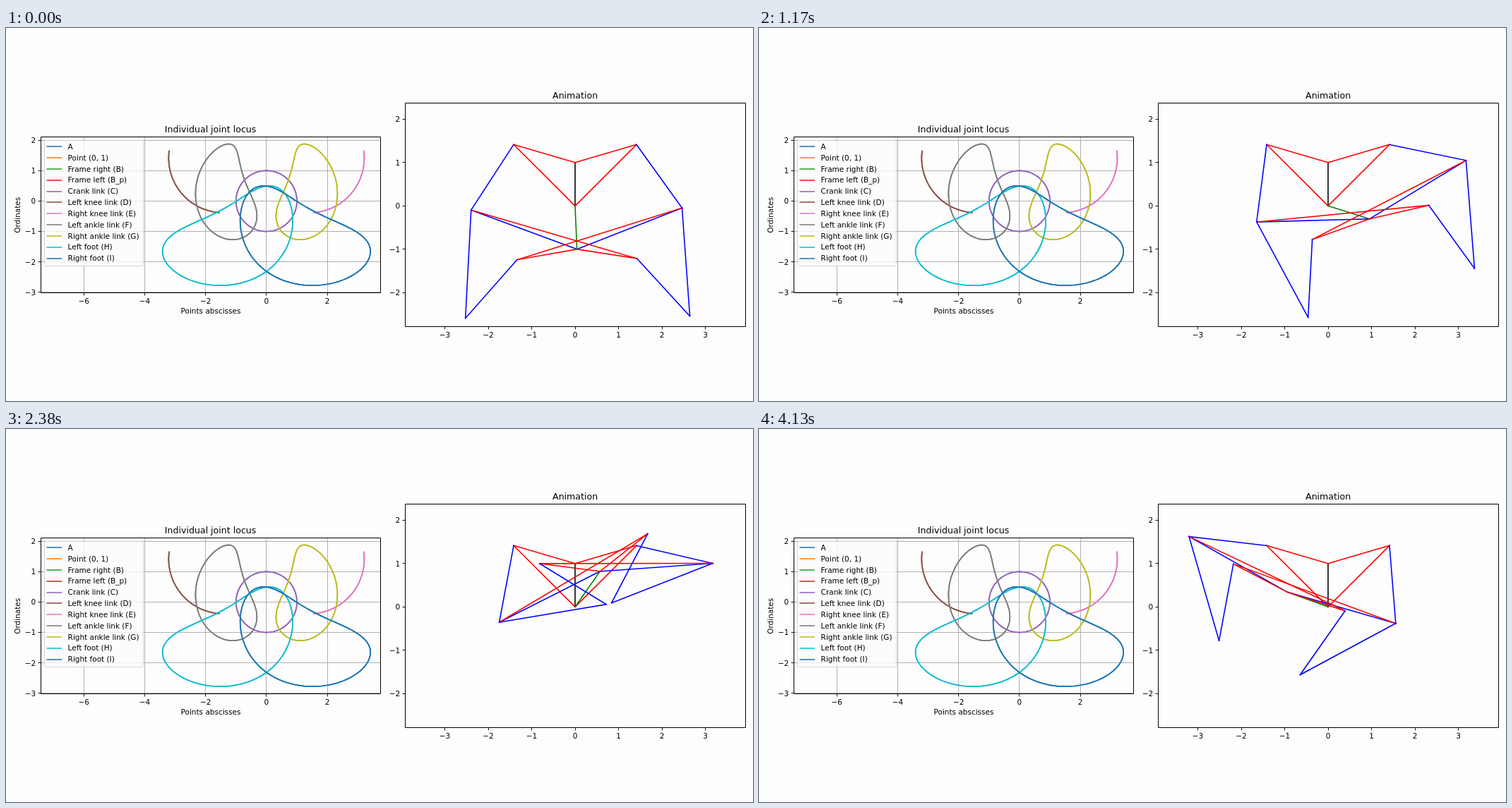
An HTML page with a canvas for the animation above (4180 ms loop, 1058 by 529 pixels).

```html
<!DOCTYPE html>
<html lang="en">
<head>
<meta charset="utf-8">
<title>Walking linkage</title>
<style>
html, body { margin: 0; width: 100%; height: 100%; overflow: hidden; background: #fdfdfd; }
canvas { display: block; }
</style>
</head>
<body>
<canvas id="stage" width="1058" height="529"></canvas>
<script>
const ctx = document.getElementById('stage').getContext('2d');
const PAPER = '#fdfdfd';
const PT = 1058 / 14 / 72;
const LOOP = 4180, FRAMES = 100;
const STEP = Math.PI / 72;

const locusPlot = {
  left: 49.5, right: 530.5, top: 154.5, bottom: 375.5,
  x0: 368.9, y0: 245.4, scale: 43.1,
  xTicks: [-6, -4, -2, 0, 2], yTicks: [2, 1, 0, -1, -2, -3],
  title: 'Individual joint locus', grid: true
};
const linkPlot = {
  left: 565.5, right: 1047.5, top: 106.5, bottom: 423.5,
  x0: 806, y0: 252.3, scale: 61.5,
  xTicks: [-3, -2, -1, 0, 1, 2, 3], yTicks: [2, 1, 0, -1, -2],
  title: 'Animation', grid: false
};

const legend = [
  ['A', '#1f77b4'], ['Point (0, 1)', '#ff7f0e'], ['Frame right (B)', '#2ca02c'],
  ['Frame left (B_p)', '#d62728'], ['Crank link (C)', '#9467bd'],
  ['Left knee link (D)', '#8c564b'], ['Right knee link (E)', '#e377c2'],
  ['Left ankle link (F)', '#7f7f7f'], ['Right ankle link (G)', '#bcbd22'],
  ['Left foot (H)', '#17becf'], ['Right foot (I)', '#1f77b4']
];
const jointNames = 'AYBPCDEFGHI';

// Bars in drawing order: colour, then pairs of joints
const bars = [
  ['#000', 'AY'], ['#f00', 'BA BY PA PY'], ['#008000', 'CA'],
  ['#00f', 'DP DC EB EC'], ['#f00', 'FC FE GC GD'], ['#00f', 'HD HF IE IG']
];

const polar = (p, r, a) => [p[0] + r * Math.cos(a), p[1] + r * Math.sin(a)];
const heading = (p, q) => Math.atan2(q[1] - p[1], q[0] - p[0]);

// Intersection of two circles, on the chosen side of the line p to q
function meet(p, rp, q, rq, side) {
  const d = Math.hypot(q[0] - p[0], q[1] - p[1]);
  const bend = Math.acos((rp * rp - rq * rq + d * d) / (2 * d * rp));
  return polar(p, rp, heading(p, q) + side * bend);
}

function pose(angle) {
  const A = [0, 0], Y = [0, 1];
  const B = polar(A, 2, Math.PI / 4), P = polar(A, 2, Math.PI * 3 / 4);
  const C = polar(A, 1, angle);
  const D = meet(P, 1.8, C, 2.6, -1), E = meet(B, 1.8, C, 2.6, 1);
  const F = polar(C, 1.4, heading(C, E) + Math.PI - 0.2);
  const G = polar(C, 1.4, heading(C, D) + Math.PI + 0.2);
  const H = meet(D, 2.5, F, 1.8, -1), I = meet(E, 2.5, G, 1.8, 1);
  return { A, Y, B, P, C, D, E, F, G, H, I };
}

const toX = (plot, x) => plot.x0 + x * plot.scale;
const toY = (plot, y) => plot.y0 - y * plot.scale;
const snap = v => Math.floor(v) + 0.5;

function line(x1, y1, x2, y2, color, width) {
  ctx.strokeStyle = color;
  ctx.lineWidth = width;
  ctx.beginPath();
  ctx.moveTo(x1, y1);
  ctx.lineTo(x2, y2);
  ctx.stroke();
}

function text(str, x, y, align = 'center', size = 10) {
  ctx.font = `${size * PT}px "DejaVu Sans", sans-serif`;
  ctx.textAlign = align;
  ctx.fillStyle = '#000';
  ctx.fillText(str, x, y);
}

const label = n => String(n).replace('-', '\u2212');

function drawGrid(plot) {
  for (const v of plot.xTicks) {
    const x = snap(toX(plot, v));
    line(x, plot.top, x, plot.bottom, '#b0b0b0', 1);
  }
  for (const v of plot.yTicks) {
    const y = snap(toY(plot, v));
    line(plot.left, y, plot.right, y, '#b0b0b0', 1);
  }
}

function drawFrame(plot) {
  const { left, right, top, bottom } = plot;
  for (const v of plot.xTicks) {
    const x = snap(toX(plot, v));
    line(x, bottom, x, bottom + 4, '#000', 0.9);
    text(label(v), toX(plot, v), bottom + 15.4);
  }
  for (const v of plot.yTicks) {
    const y = snap(toY(plot, v));
    line(left - 4, y, left, y, '#000', 0.9);
    text(label(v), left - 7.3, toY(plot, v) + 3.9, 'right');
  }
  ctx.lineWidth = 1;
  ctx.strokeStyle = '#000';
  ctx.strokeRect(left, top, right - left, bottom - top);
  text(plot.title, (left + right) / 2 - 0.4, top - 6.4, 'center', 12);
}

function drawLoci(plot) {
  const lap = Array.from({ length: 145 }, (_, i) => pose(i * STEP));
  ctx.lineWidth = 1.5 * PT;
  ctx.lineJoin = 'round';
  for (let j = 4; j < jointNames.length; j++) {
    ctx.strokeStyle = legend[j][1];
    ctx.beginPath();
    for (const joints of lap) {
      const [x, y] = joints[jointNames[j]];
      ctx.lineTo(toX(plot, x), toY(plot, y));
    }
    // Repeated laps harden the edges of the curve
    for (let n = 0; n < 3; n++) ctx.stroke();
  }
}

function drawLegend() {
  ctx.beginPath();
  ctx.roundRect(54.5, 159.5, 140, 178, 2);
  ctx.globalAlpha = 0.8;
  ctx.fillStyle = PAPER;
  ctx.fill();
  ctx.strokeStyle = '#ccc';
  ctx.lineWidth = 1;
  ctx.stroke();
  ctx.globalAlpha = 1;
  legend.forEach(([name, color], i) => {
    const y = 168.3 + i * 15.83;
    line(57.5, Math.round(y), 79, Math.round(y), color, 1.5 * PT);
    text(name, 87.6, y + 3.7, 'left');
  });
}

function drawLocusPlot() {
  const plot = locusPlot;
  drawGrid(plot);
  drawLoci(plot);
  drawFrame(plot);
  drawLegend();
  text('Points abscisses', 290, 405.2);
  ctx.save();
  ctx.translate(20, 265.3);
  ctx.rotate(-Math.PI / 2);
  text('Ordinates', 0, 0);
  ctx.restore();
}

function drawLinkage(angle) {
  const plot = linkPlot, joints = pose(angle);
  ctx.save();
  ctx.beginPath();
  ctx.rect(plot.left, plot.top, plot.right - plot.left, plot.bottom - plot.top);
  ctx.clip();
  ctx.lineCap = 'square';
  for (const [color, pairs] of bars) {
    for (const [from, to] of pairs.split(' ')) {
      const p = joints[from], q = joints[to];
      line(toX(plot, p[0]), toY(plot, p[1]), toX(plot, q[0]), toY(plot, q[1]), color, 1.5 * PT);
    }
  }
  ctx.restore();
  drawFrame(plot);
}

// 24 steps per second, each start rounded to a hundredth of a second
function frameAt(ms) {
  const hundredths = Math.floor(ms / 10);
  return Math.min(FRAMES - 1, Math.ceil((24 * hundredths + 12) / 100) - 1);
}

let shown = -1;
function tick() {
  const frame = frameAt(performance.now() % LOOP);
  if (frame !== shown) {
    shown = frame;
    ctx.fillStyle = PAPER;
    ctx.fillRect(0, 0, 1058, 529);
    drawLocusPlot();
    drawLinkage(-Math.PI / 2 + (frame + 1) * STEP);
  }
  requestAnimationFrame(tick);
}
tick();
</script>
</body>
</html>
```
